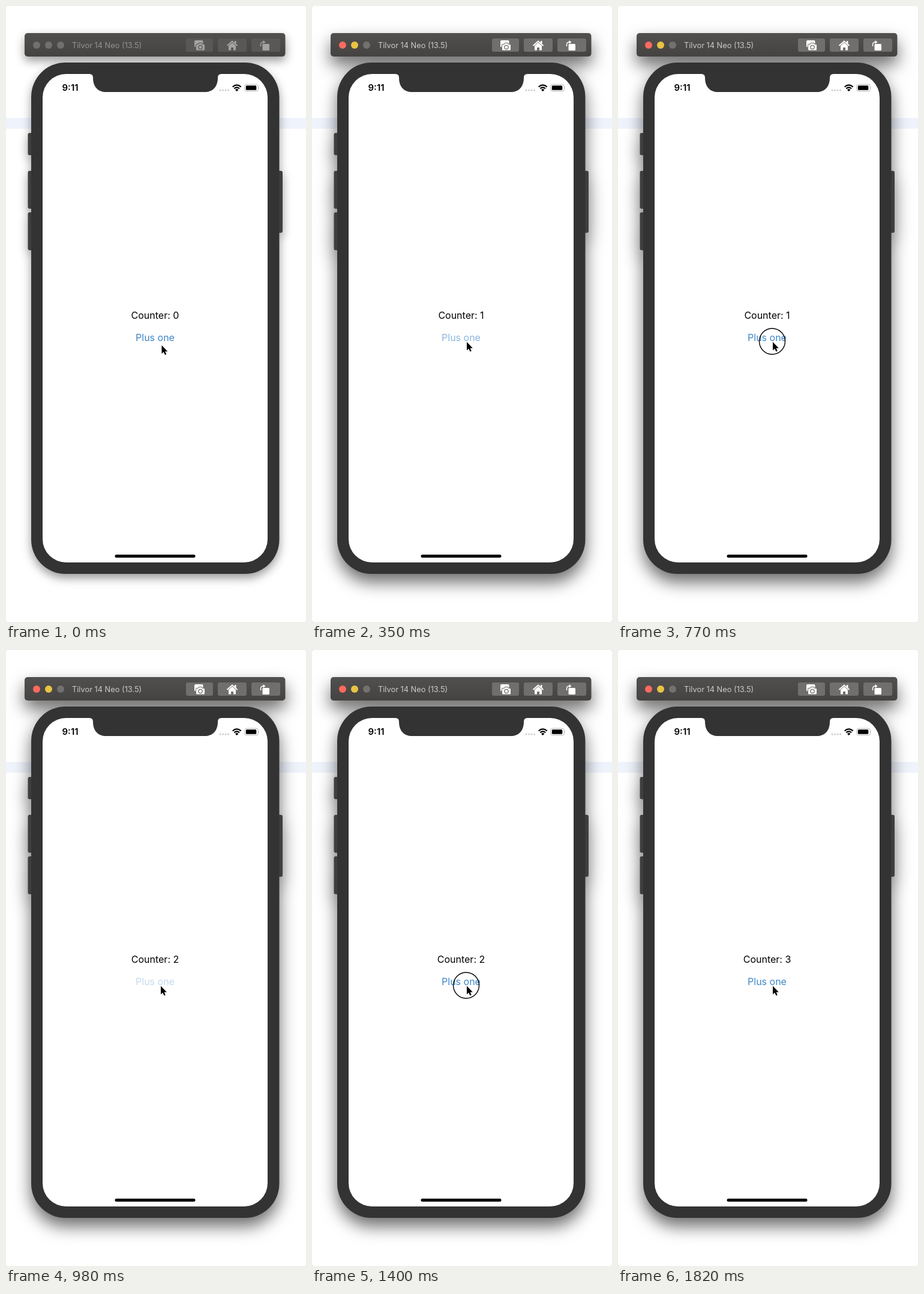
An HTML page for the animation above (1890 ms loop, 500 px wide and 1024 px high).

```html
<!DOCTYPE html>
<html lang="en">
<head>
<meta charset="utf-8">
<title>Counter</title>
<style>
  html, body { margin: 0; width: 100%; height: 100%; overflow: hidden; background: #aaa; }
  svg { display: block; width: 100vw; height: 100vh; font-family: Inter, sans-serif; }

  #window { filter: drop-shadow(0 14px 14px rgba(0, 0, 0, .58)); }
  .title { fill: #cbcac9; }
  .button { fill: #716f6d; }
  .icon { fill: #fff; stroke: #fff; }
  .hole { fill: #716f6d; stroke: #716f6d; }
  .close { fill: #fb6a60; }
  .minimize { fill: #e8c344; }
  .zoom { fill: #73716f; }

  .inactive #window { filter: drop-shadow(0 7px 8px rgba(0, 0, 0, .4)); }
  .inactive .title { fill: #959391; }
  .inactive .button { fill: #5a5856; }
  .inactive .icon { fill: #a4a3a2; stroke: #a4a3a2; }
  .inactive .hole { fill: #5a5856; stroke: #5a5856; }
  .inactive .light { fill: #71706e; }
</style>
</head>
<body>
<svg id="stage" viewBox="0 0 500 1024" preserveAspectRatio="none">
  <defs>
    <linearGradient id="bar" x2="0" y2="1">
      <stop stop-color="#52504e"/><stop offset="1" stop-color="#454341"/>
    </linearGradient>
  </defs>
  <rect width="500" height="1024" rx="2" fill="#fff"/>
  <rect y="186" width="500" height="18" fill="#eef3fc"/>

  <g id="window">
    <g fill="#403f3e">
      <rect x="36.5" y="211" width="9" height="37" rx="3"/>
      <rect x="36.5" y="274" width="9" height="63" rx="3"/>
      <rect x="36.5" y="343" width="9" height="63" rx="3"/>
      <rect x="452" y="274" width="9" height="103" rx="3"/>
    </g>
    <rect x="42" y="94" width="413.5" height="850" rx="57" fill="#333"/>
    <rect x="31" y="45" width="434.5" height="39" rx="5" fill="url(#bar)"/>
  </g>

  <!-- toolbar -->
  <circle class="light close" cx="51" cy="65" r="6"/>
  <circle class="light minimize" cx="71" cy="65" r="6"/>
  <circle class="light zoom" cx="91" cy="65" r="6"/>
  <text class="title" x="110" y="70" font-size="12.8">Tilvor 14 Neo (13.5)</text>
  <g class="button">
    <rect x="300" y="54" width="45" height="22" rx="3"/>
    <rect x="353" y="54" width="48" height="22" rx="3"/>
    <rect x="409" y="54" width="48" height="22" rx="3"/>
  </g>
  <g class="icon" stroke-width="0">
    <rect x="314" y="57" width="14.5" height="11.5" rx="2"/>
    <path class="hole" stroke-width="2" d="M318 64h2.5l1.5-2h4l1.5 2h2.5q1 0 1 1v7.500q0 1-1 1h-12q-1 0-1-1v-7.500q0-1 1-1z"/>
    <path d="M318 64h2.500l1.500-2h4l1.500 2h2.500q1 0 1 1v7.500q0 1-1 1h-12q-1 0-1-1v-7.500q0-1 1-1z"/>
    <circle class="hole" cx="324" cy="68.500" r="3.800"/>
    <circle cx="324" cy="68.500" r="2.500"/>
    <path fill="none" stroke-width="1.800" d="M368.500 66l8.500-7.500 8.500 7.500"/>
    <path d="M381 58h2.500v5l-2.500-2zM371 66l6-5.300 6 5.300v7.500h-4v-4.500h-4v4.500h-4z"/>
    <rect x="427.500" y="63" width="11.500" height="11" rx="1.500"/>
    <path fill="none" stroke-width="1.500" d="M424.500 67v-3q0-4 5-4"/>
    <path d="M428.500 57l4 3-4 3z"/>
  </g>

  <!-- screen -->
  <rect x="61" y="113" width="375" height="812" rx="39" fill="#fff"/>
  <path fill="#333" d="M139 112v1q6 0 6 6c0 16 9 24 22 24h164c13 0 22-8 22-24q0-6 6-6v-1z"/>
  <text x="93.500" y="141" font-size="15" font-weight="600">9:11</text>
  <path stroke="#ccc" stroke-width="3" stroke-linecap="round" stroke-dasharray="0 4.500" d="M357 140h14"/>
  <g fill="none" stroke="#000" stroke-width="2.200">
    <path d="M377.700 134.500q7-6.300 14 0M380.300 137.300q4.400-3.900 8.800 0"/>
    <path fill="#000" stroke="none" d="M382 139.200q2.700-2.300 5.400 0l-2.700 2.800z"/>
  </g>
  <rect x="397.800" y="130.300" width="22.500" height="11.400" rx="3.300" fill="none" stroke="#b5b5b5"/>
  <rect x="399.800" y="132.200" width="17.500" height="7.600" rx="1.600"/>
  <path fill="#b5b5b5" d="M421.300 134q1.500 2 0 4z"/>
  <rect x="181.500" y="912" width="134" height="5" rx="2.500"/>
  <g text-anchor="middle" font-size="16">
    <text id="counter" x="248.500" y="520"></text>
    <text id="plus" x="248.500" y="556.500" fill="#3f86c8">Plus one</text>
  </g>

  <g id="pointer">
    <circle id="ring" r="21.500" fill="none" stroke="#000" stroke-width="1.400"/>
    <path stroke="#fff" stroke-width="1" paint-order="stroke" d="M1 1v14l3.200-3 2.300 5 2.300-1-2.200-4.800h4.200z"/>
  </g>
</svg>
<script>
  const STEP = 70, LOOP = 1890, RING_STEPS = 2;
  // Button opacity, one value per step after each release.
  const clicks = [
    { start: 210, fade: [.6, .45, .8] },
    { start: 770, fade: [.38, .3, .6, .92] },
    { start: 1400, fade: [.38, .3, .6, .92] }
  ];
  const [stage, counter, plus, pointer, ring] =
    ['stage', 'counter', 'plus', 'pointer', 'ring'].map(id => document.getElementById(id));

  function draw(now) {
    const time = Math.floor(now % LOOP / STEP) * STEP;
    let count = 0, opacity = 1, pressed = false;
    for (const { start, fade } of clicks) {
      const step = (time - start) / STEP;
      if (step >= RING_STEPS) {
        count++;
        opacity = fade[step - RING_STEPS] ?? 1;
      } else if (step >= 0) {
        pressed = true;
      }
    }
    const travel = Math.min(time / clicks[0].start, 1);
    stage.classList.toggle('inactive', count === 0);
    counter.textContent = `Counter: ${count}`;
    plus.setAttribute('opacity', opacity);
    ring.setAttribute('visibility', pressed ? 'visible' : 'hidden');
    pointer.setAttribute('transform', `translate(${258.5 - 1.5 * travel} ${563 - 5.500 * travel})`);
  }

  const origin = performance.now();
  function tick() {
    draw(performance.now() - origin);
    requestAnimationFrame(tick);
  }
  tick();
</script>
</body>
</html>
```
